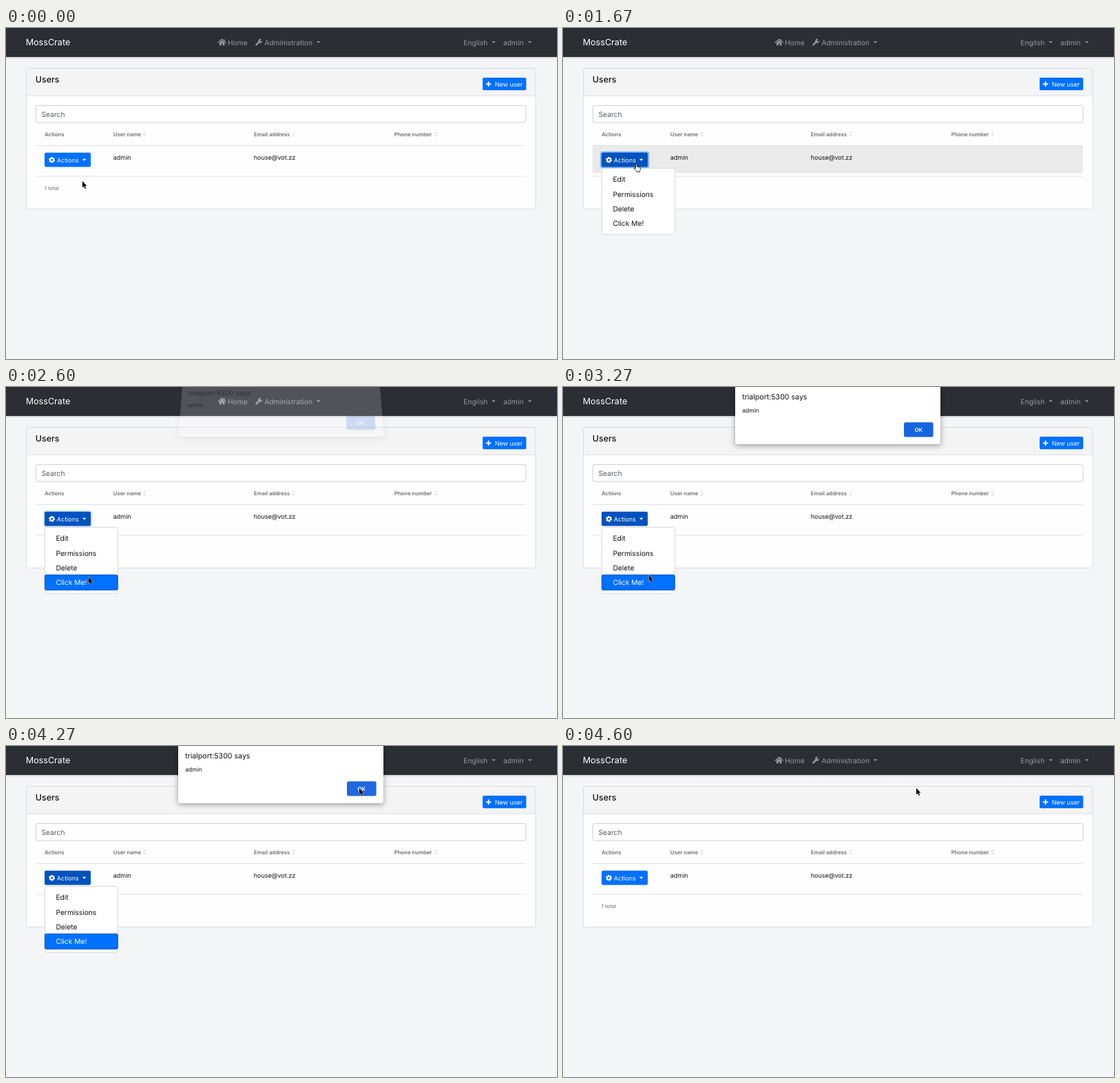
Recreate the animation shown at these times as an HTML page. Size 800 px wide and 480 px high, loop 4.99 s.

```html
<!DOCTYPE html>
<html lang="en">
<head>
<meta charset="utf-8">
<title>Users</title>
<style>
  html, body { margin: 0; width: 100%; height: 100%; overflow: hidden; background: #f4f5f7; }
  #stage { position: relative; width: 800px; height: 480px; overflow: hidden; }
  svg { position: absolute; left: 0; top: 0; display: block; overflow: visible; }
  text { font-family: Inter, "Open Sans", sans-serif; font-size: 10.25px; fill: #111; text-rendering: geometricPrecision; white-space: pre; }
  .nav text { fill: #96989a; }
  .nav .brand { font-size: 12.6px; fill: #fff; }
  .small { font-size: 9px; }
  .head text { font-size: 7.74px; font-weight: 600; fill: #6c6e70; }
  .white { fill: #fff; }
  #dialog {
    position: absolute; left: 249.5px; top: 0; width: 298.5px; height: 83px;
    background: #fff; border-radius: 0 0 2px 2px; transform-origin: 50% 100%;
    box-shadow: 0 2px 9px rgba(0,0,0,.36), 0 0 1px rgba(0,0,0,.4);
  }
</style>
</head>
<body>
<div id="stage">
  <svg width="800" height="480">
    <defs>
      <linearGradient id="drop" x2="0" y2="1">
        <stop stop-color="#000" stop-opacity=".16"/>
        <stop offset="1" stop-color="#000" stop-opacity="0"/>
      </linearGradient>
      <path id="caret" d="M0 0h5.6l-2.8 2.9z"/>
      <path id="sort" d="M0 1.6 1.7 0 3.4 1.6M0 3.9 1.7 5.5 3.4 3.9" fill="none" stroke="#b4b6b8" stroke-width=".8"/>
    </defs>
    <rect width="800" height="480" fill="#f4f5f7"/>
    <rect y="42" width="800" height="3" fill="url(#drop)"/>
    <rect width="800" height="42" fill="#2b2f34"/>
    <g class="nav" fill="#96989a">
      <text class="brand" x="28.7" y="25.2">MossCrate</text>
      <path d="M308.2 21 313.7 16.3 319.2 21" fill="none" stroke="#96989a" stroke-width="1.3" stroke-linecap="round"/>
      <path d="M309.9 21.3 313.7 18.1 317.5 21.3V25.2H314.7V22.4H312.7V25.2H309.9zM316.3 16.4h1.3v2.6l-1.3-1z"/>
      <text x="322" y="24.7">Home</text>
      <path d="M363.4 24.3 368 19.7" stroke="#96989a" stroke-width="2.5" stroke-linecap="round"/>
      <path d="M370.7 16.1A3 3 0 1 0 372.1 18.2L370 19.7 368.5 18.2z"/>
      <text x="375.2" y="24.7">Administration</text>
      <use href="#caret" x="450.8" y="19.2"/>
      <text x="664.3" y="24.7">English</text>
      <use href="#caret" x="705.3" y="19.2"/>
      <text x="722" y="24.7">admin</text>
      <use href="#caret" x="757.7" y="19.2"/>
    </g>

    <rect x="29.5" y="58.5" width="739.5" height="204" rx="2.7" fill="#fefefe"/>
    <path d="M29.5 98.3V61.2Q29.5 58.5 32.2 58.5H766.3Q769 58.5 769 61.2V98.3z" fill="#f4f4f4"/>
    <path d="M29.5 98.4H769" stroke="#d9dadb" stroke-width=".8"/>
    <rect x="29.5" y="58.5" width="739.5" height="204" rx="2.7" fill="none" stroke="#d9dadb" stroke-width=".9"/>
    <text x="42.8" y="79.2" font-weight="500" style="font-size:12.4px">Users</text>
    <rect x="692" y="72" width="63.3" height="18.2" rx="2" fill="#0070ff"/>
    <path d="M696.8 81.3h7.6M700.6 77.5v7.6" stroke="#fff" stroke-width="1.8"/>
    <text class="small white" x="709.7" y="84.6">New user</text>
    <rect x="43.4" y="112.4" width="711.6" height="24.7" rx="2.7" fill="#fff" stroke="#c6cacd" stroke-width=".9"/>
    <text x="51.5" y="128.8" style="fill:#55595d">Search</text>

    <g class="head">
      <text x="56" y="156.8">Actions</text>
      <text x="155.8" y="156.8">User name</text>
      <text x="359.8" y="156.8">Email address</text>
      <text x="563.8" y="156.8">Phone number</text>
      <use href="#sort" x="199.5" y="151.3"/>
      <use href="#sort" x="415.8" y="151.3"/>
      <use href="#sort" x="622.2" y="151.3"/>
    </g>
    <rect id="row" x="43" y="170.5" width="712" height="40" fill="#eaeaea"/>
    <path d="M43 170.5H755M43 215H755" stroke="#dcdee0" stroke-width=".9"/>
    <text class="small" x="155.7" y="191.3">admin</text>
    <text class="small" x="359.7" y="191.3">house@vot.zz</text>
    <text x="55.8" y="234.8" style="font-size:7.74px;fill:#6c6e70">1 total</text>

    <rect id="ring" x="55" y="180" width="69.2" height="22.4" rx="3" fill="none" stroke="#7db3fb" stroke-width="2.2"/>
    <rect id="button" x="56" y="180.8" width="67" height="20.6" rx="2"/>
    <g fill="none" stroke="#fff">
      <circle cx="66.6" cy="191.3" r="2.5" stroke-width="2"/>
      <circle cx="66.6" cy="191.3" r="3.7" stroke-width="1.6" stroke-dasharray="1.94 1.935"/>
    </g>
    <text class="small white" x="73.8" y="194.7">Actions</text>
    <use href="#caret" x="110.9" y="189.8" fill="#fff"/>

    <g id="menu">
      <rect x="56.4" y="203.4" width="106" height="96" rx="2.7" fill="#fff" stroke="#d3d4d5" stroke-width=".9"/>
      <rect id="hover" x="57" y="209" width="105" height="21.4" fill="#f5f6f7"/>
      <rect id="pick" x="56.4" y="272.4" width="105.8" height="22" rx="2" fill="#0070ff" stroke="#0055c4" stroke-width="1"/>
      <text x="72.4" y="223.2">Edit</text>
      <text x="72.4" y="244.6">Permissions</text>
      <text x="72.4" y="266">Delete</text>
      <text id="last" x="72.4" y="287.4">Click Me!</text>
    </g>
  </svg>

  <div id="dialog">
    <svg width="298.5" height="83">
      <text x="10.2" y="18.2" style="font-size:10.6px">trialport:5300 says</text>
      <text x="10.3" y="37.3" style="font-size:8.5px">admin</text>
      <rect id="ok" x="245" y="51.3" width="42.6" height="21.2" rx="2.5"/>
      <text class="white" x="260.4" y="64.7" font-weight="600" style="font-size:7.8px">OK</text>
    </svg>
  </div>

  <svg width="800" height="480">
    <g id="cursor" stroke-linejoin="round">
      <path id="arrow" d="M0 0V9.4L2.1 7.5 3.6 11 5.1 10.4 3.6 7H6.4z" fill="#000" stroke="#fff" stroke-width=".8" paint-order="stroke"/>
      <path id="hand" d="M-1 6.2V1A.95.95 0 0 1 .9 1V4.3Q1.8 3.7 2.6 4.6 3.5 4.1 4.2 5 5.8 4.7 5.8 6.2V8.1Q5.8 9.5 5 10.5V11.6H.2V10.8L-2.9 7.5Q-3.8 5.9-2.5 5.9-1.7 5.9-1 7.1z" fill="#fff" stroke="#000" stroke-width=".8"/>
    </g>
  </svg>
</div>
<script>
const LOOP = 4990, STEP = 200 / 3;
const el = id => document.getElementById(id);
const clamp = v => Math.min(1, Math.max(0, v));
const ramp = (t, from, to) => clamp((t - from) / (to - from));
const mix = (a, b, p) => a.map((v, i) => v + (b[i] - v) * p);
const rgb = c => `rgb(${c.map(Math.round)})`;
const show = (id, on) => { el(id).style.display = on ? '' : 'none'; };

const smooth = p => p * p * (3 - 2 * p);
const linear = p => p;
const easeOut = p => 1 - (1 - p) ** 3;

// time, x, y, easing used to arrive there
const path = [
  [400, 111, 222],
  [933, 105.3, 192.3, smooth],
  [1400, 105.3, 192.3, linear],
  [1534, 106, 193.3, linear],
  [1600, 106, 193.3, linear],
  [2133, 116.8, 278.4, smooth],
  [2200, 116.8, 279.3, linear],
  [2530, 116.8, 279.3, linear],
  [2600, 119.7, 275.5, linear],
  [3230, 119.7, 275.5, linear],
  [3733, 446, 73, smooth],
  [3867, 503, 60.5, linear],
  [4267, 513, 61, easeOut]
];

function pointer(t) {
  const i = path.findIndex(k => k[0] > t);
  if (i === 0) return path[0].slice(1);
  if (i < 0) return path[path.length - 1].slice(1, 3);
  const a = path[i - 1], b = path[i];
  return mix(a.slice(1, 3), b.slice(1, 3), b[3](ramp(t, a[0], b[0])));
}

const BLUE = [0, 112, 255], HOVER = [0, 88, 208], ACTIVE = [0, 82, 190];

function buttonColor(t) {
  if (t < 1140) return mix(BLUE, HOVER, ramp(t, 760, 920));
  if (t < 4380) return mix(HOVER, ACTIVE, ramp(t, 1140, 1290));
  return mix(ACTIVE, BLUE, ramp(t, 4370, 4560));
}

function draw(t) {
  const [x, y] = pointer(t);
  const hand = t > 730 && t < 2590;
  el('cursor').setAttribute('transform', `translate(${x} ${y})`);
  show('hand', hand);
  show('arrow', !hand);

  el('row').style.opacity = ramp(t, 600, 900) - ramp(t, 1700, 2000);
  el('button').style.fill = rgb(buttonColor(t));
  el('ring').style.opacity = ramp(t, 1140, 1290) - ramp(t, 2500, 2650);

  const picked = t > 2520;
  const item = Math.floor((y - 209) / 21.4);
  show('menu', t > 1260 && t < 4380);
  show('hover', !picked && item >= 0 && item < 4);
  el('hover').setAttribute('y', 209 + 21.4 * item);
  show('pick', picked);
  el('last').style.fill = picked ? '#fff' : '#111';

  const away = t < 3000 ? 1 - ramp(t, 2560, 2790) : ramp(t, 4300, 4560);
  show('dialog', away < 1);
  el('dialog').style.opacity = 1 - away;
  el('dialog').style.transform = away
    ? `translateY(${-13 * away}px) perspective(530px) rotateX(${20 * away}deg)`
    : 'none';
  el('ok').style.fill = t > 3840 ? '#2068de' : '#1764df';
}

const start = performance.now();
function tick() {
  const t = (performance.now() - start) % LOOP;
  draw(Math.floor((t + 4) / STEP) * STEP);
  requestAnimationFrame(tick);
}
tick();
</script>
</body>
</html>
```
